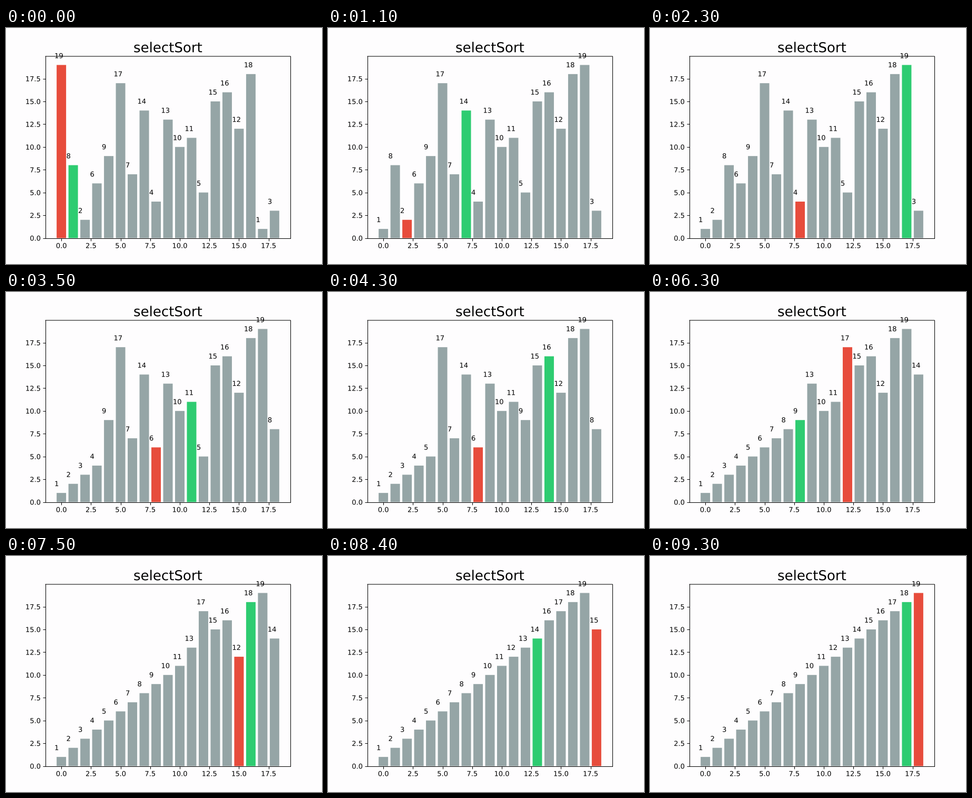
Recreate the animation shown at these times as a matplotlib script. Size 600 by 450 pixels, loop 9.4 s.

```python
import matplotlib.pyplot as plt
from matplotlib.animation import FuncAnimation
from matplotlib.patheffects import Normal

PAPER = "#fefdfe"
GRAY, RED, GREEN = "#95a5a6", "#e74c3c", "#2ecc71"
VALUES = [19, 8, 2, 6, 9, 17, 7, 14, 4, 13, 10, 11, 5, 15, 16, 12, 18, 1, 3]
FRAMES, INTERVAL = 94, 100
LABEL_DX, LABEL_DY = -0.58, 0.75

plt.rcParams.update({
    "font.family": "DejaVu Sans",
    "figure.facecolor": PAPER,
    "axes.facecolor": PAPER,
})


def selection_steps(values):
    """List every step as (values, red index, green index or None)."""
    data = list(values)
    n = len(data)
    steps = []

    def record(red, green=None):
        steps.append((data[:], red, green))

    for i in range(n - 1):
        low = i
        record(low)
        for j in range(i + 1, n):
            record(low, j)
            if data[j] < data[low]:
                low = j
        record(low, i)
        data[i], data[low] = data[low], data[i]
        record(low, i)
    return steps


steps = selection_steps(VALUES)

fig, ax = plt.subplots(figsize=(6.4, 4.8), dpi=93.75)
ax.set_title("selectSort", fontsize=20)
bars = ax.bar(range(len(VALUES)), VALUES, width=0.8, color=GRAY)
labels = [ax.text(i + LABEL_DX, v + LABEL_DY, str(v), fontsize=10)
          for i, v in enumerate(VALUES)]
ax.set_xlim(-1.34, 19.34)
ax.set_ylim(0, 19.95)

# Keep positions between whole pixels: soft bar edges, text drawn as outlines.
for shape in [*bars, ax.spines["top"]]:
    shape.set_snap(False)
for text in [ax.title, *labels, *ax.get_xticklabels(), *ax.get_yticklabels()]:
    text.set_path_effects([Normal()])


def draw(frame):
    # Steps run at 24 per second, the picture at 10 per second.
    data, red, green = steps[1 + frame * 12 // 5]
    for i, (bar, label, value) in enumerate(zip(bars, labels, data)):
        bar.set_height(value)
        bar.set_facecolor(RED if i == red else GREEN if i == green else GRAY)
        label.set_y(value + LABEL_DY)
        label.set_text(str(value))
    return [*bars, *labels]


anim = FuncAnimation(fig, draw, frames=FRAMES, interval=INTERVAL,
                     init_func=lambda: draw(0), repeat=True)
plt.show()
```
